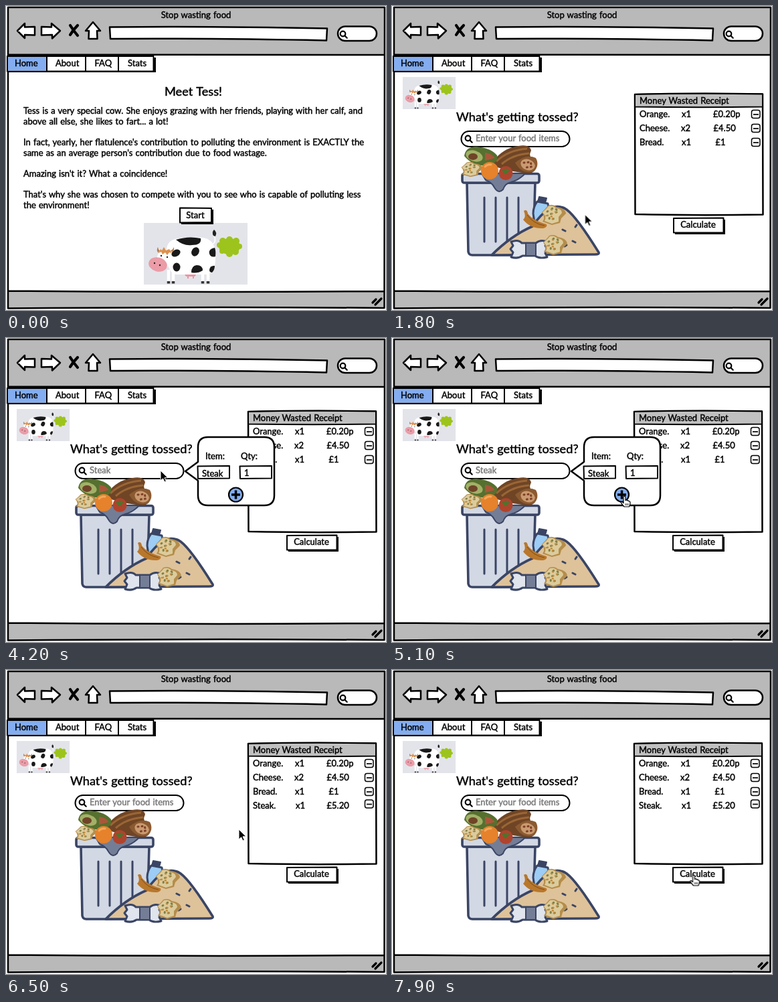
An HTML page that plays this animation: 568 by 454 pixels, repeating every 8000 ms.

```html
<!DOCTYPE html>
<html lang="en">
<head>
<meta charset="utf-8">
<title>Stop wasting food</title>
<style>
html, body { margin: 0; width: 100%; height: 100%; overflow: hidden; background: #fff; }
svg { display: block; }
text { font: 13px Lato, "Liberation Sans", sans-serif; word-spacing: .8px; fill: #000; stroke: #000; stroke-width: .45px; }
.title { font-size: 18.2px; }
.mid { text-anchor: middle; }
.hint { fill: #777; stroke: #777; }
.ink { fill: #fff; stroke: #000; stroke-width: 2.5; stroke-linejoin: round; stroke-linecap: round; }
.thin { stroke-width: 2; }
.line { fill: none; }
.blue { fill: #83adf0; }
.navy { stroke: #3a4565; stroke-width: 3.6; stroke-linejoin: round; stroke-linecap: round; }

.timed { animation: 8s step-end infinite; }
.home { animation-name: home; }
.toss { animation-name: toss; }
.idle { animation-name: idle; }
.adding { animation-name: adding; }
.added { animation-name: added; }
.receipt { animation-name: lift; }
.arrow { animation-name: arrow; }
.hand { animation-name: hand; }
.pointer { animation: move 8s ease-in-out infinite; }

@keyframes home { 0% { visibility: visible } 22.5%, 100% { visibility: hidden } }
@keyframes toss { 0% { visibility: hidden } 22.5%, 100% { visibility: visible } }
@keyframes idle { 0% { visibility: hidden } 22.5% { visibility: visible } 47.5% { visibility: hidden } 72.5%, 100% { visibility: visible } }
@keyframes adding { 0% { visibility: hidden } 47.5% { visibility: visible } 72.5%, 100% { visibility: hidden } }
@keyframes added { 0% { visibility: hidden } 72.5%, 100% { visibility: visible } }
@keyframes lift { 0% { transform: none } 47.5%, 100% { transform: translate(-1px, -22px) } }
@keyframes arrow {
  0% { visibility: hidden } 1.25% { visibility: visible } 13.75% { visibility: hidden }
  22.5% { visibility: visible } 33% { visibility: hidden } 47.5% { visibility: visible }
  61% { visibility: hidden } 72.5% { visibility: visible } 89.5%, 100% { visibility: hidden }
}
@keyframes hand {
  0% { visibility: hidden } 13.75% { visibility: visible } 22.5% { visibility: hidden }
  33% { visibility: visible } 47.5% { visibility: hidden } 61% { visibility: visible }
  72.5% { visibility: hidden } 89.5%, 100% { visibility: visible }
}
@keyframes move {
  0%, 1.25% { transform: translate(360px, 432px); animation-timing-function: ease-in }
  11.25% { transform: translate(342px, 387px); animation-timing-function: ease-out }
  15%, 25% { transform: translate(288.5px, 311.5px) }
  35%, 55% { transform: translate(231px, 198px) }
  62.5%, 82.5% { transform: translate(348px, 238px) }
  92.5%, 100% { transform: translate(451.5px, 308px) }
}
</style>
</head>
<body>
<svg width="568" height="454" viewBox="0 0 568 454">
  <defs>
    <g id="cow">
      <path fill="#e3e4ea" d="M0 0h155v92H0z"/>
      <g fill="#9dc41c">
        <ellipse cx="128" cy="35" rx="16" ry="12"/>
        <circle cx="113" cy="33" r="4"/><circle cx="118" cy="27" r="5"/><circle cx="128" cy="25" r="5"/>
        <circle cx="138" cy="27" r="5"/><circle cx="143" cy="35" r="4"/><circle cx="137" cy="43" r="5"/>
        <circle cx="128" cy="46" r="5"/><circle cx="117" cy="42" r="4"/>
      </g>
      <path fill="none" stroke="#fff" stroke-width="1.5" d="M103 32q6-4 2-13"/>
      <path fill="#222" d="M104 19q-3-5 1-9q5 4 2 10z"/>
      <path stroke="#fff" stroke-width="4.500" d="M37 70v20M44 70v20M88 70v20M96 70v20"/>
      <path stroke="#333" stroke-width="4.500" d="M37 87v3.500M44 87v3.500M88 87v3.500M96 87v3.500"/>
      <path fill="#e9959f" d="M61 75h17q0 5-3 5v3h-2v-3h-6v3h-2v-3q-4 0-4-5z"/>
      <path fill="#fff" d="M34 42C34 25 46 22 68 22C94 20 105 24 107 44C108 68 104 77 90 77H52C40 78 34 66 34 42z"/>
      <g fill="#191919">
        <path d="M48 25Q67 19 85 23Q87 33 72 33Q60 35 48 25z"/>
        <ellipse cx="48" cy="45" rx="7" ry="5" transform="rotate(-30 48 45)"/>
        <ellipse cx="77" cy="43" rx="5.500" ry="7" transform="rotate(30 77 43)"/>
        <path d="M106 37q-10 2-8 9q2 6 9 4q1-8-1-13zM71 74q0-10 8-11q9 0 9 8q-8 5-17 3z"/>
        <ellipse cx="49" cy="66" rx="5.500" ry="6.500"/>
        <path d="M106 64q-7-1-8 6q0 4 4 4q4-4 4-10z"/>
      </g>
      <path fill="#b57a4b" d="M22 45q-4-4-1-9q1 6 5 6zM41 45q5-3 4-9q-2 5-7 6z"/>
      <path fill="#fff" d="M23 42q10-5 19 1l-6 22q-9 6-20-3z"/>
      <path fill="#dc914f" d="M22 45l3-6 2 2 3-5 3 5 5-2 4 6-4-1-3 4-3-4-4 3-2-4z"/>
      <ellipse cx="21" cy="62" rx="14" ry="10.500" fill="#eb9ca7" transform="rotate(15 21 62)"/>
      <g fill="#222">
        <circle cx="26" cy="49" r="1.200"/><circle cx="35" cy="51" r="1.200"/>
        <circle cx="16" cy="60" r="1.200"/><circle cx="24" cy="63" r="1.200"/>
      </g>
    </g>

    <g id="slice">
      <path fill="#b58d4a" d="M-17-4Q-11-10-8-14Q0-17 5-12Q18-10 19-2L12 5 10 12-2 15-16 10Q-11 4-17-4z"/>
      <path fill="#dccb9c" d="M-16-4Q-10-9-7-13Q0-15 4-10Q13-9 13-3L8 3 8 10-2 13-13 9Q-9 3-16-4z"/>
      <path fill="none" stroke="#7f7f45" stroke-width="3" stroke-linecap="round" stroke-dasharray="1 7" d="M-9-5L1-11 8-5-5-1-6 7 5 5"/>
      <path fill="none" stroke="#c08a3c" stroke-width="2.500" stroke-linecap="round" stroke-dasharray="1 6" d="M-3-8L4-4-9 1 1 3-4 10"/>
    </g>

    <g id="minus">
      <rect x="537.500" y="-6.500" width="12.500" height="12" rx="3" fill="#fff" stroke="#000" stroke-width="1.500"/>
      <path stroke="#000" stroke-width="1.700" d="M540 0h8"/>
    </g>

    <g id="lens" class="line" stroke="#000" stroke-width="2.200" stroke-linecap="round">
      <circle r="3.800"/><path d="M3 3l3.200 3.200"/>
    </g>
  </defs>

  <!-- browser window -->
  <path fill="#b9b9b9" d="M3 2h563v71H3zM3 426h563v25H3z"/>
  <path class="ink line" d="M3 2Q200 1 566 2L565.500 451Q300 449 3 451.500Q2 220 3 2M3 72.500Q300 74 566 73M3 425.500Q290 428 565 426"/>
  <text class="mid" x="284" y="18">Stop wasting food</text>
  <g class="ink">
    <path d="M17 37L28 26V31.500L43 31V43.500L28 43V48z"/>
    <path d="M53 31L68 31.500V26L81 37 69 48.500V43L53 43.500z"/>
    <path d="M130 24L119 37H124L123.500 49H136.500L136 37H141z"/>
    <path d="M155 31.500Q300 30 480 33.500L479 51.500Q300 48 156 49z"/>
    <rect x="496" y="30.500" width="58" height="21.500" rx="10.750"/>
  </g>
  <path fill="none" stroke="#000" stroke-width="4.200" stroke-linecap="round" d="M96 29Q101 37 107 44M107 29Q100 36 96 43"/>
  <use href="#lens" x="503.500" y="41.500"/>
  <path stroke="#000" stroke-width="3.200" stroke-linecap="round" d="M548 443l5-5M552 446l9-9"/>

  <!-- tabs -->
  <path d="M4 77H224V99H4z"/>
  <path class="ink thin" d="M2 75H220.500V97.500H2z"/>
  <path class="blue" d="M3 76H60V96.500H3z"/>
  <path class="ink thin line" d="M61 75V97M119 75V97M168 75V97"/>
  <text x="13" y="90">Home</text>
  <text x="74" y="90">About</text>
  <text x="132.500" y="90">FAQ</text>
  <text x="182" y="90">Stats</text>

  <!-- welcome page -->
  <g class="timed home">
    <text class="title mid" x="280" y="134">Meet Tess!</text>
    <text x="26" y="161">Tess is a very special cow. She enjoys grazing with her friends, playing with her calf, and</text>
    <text x="26" y="177">above all else, she likes to fart... a lot!</text>
    <text x="26" y="208">In fact, yearly, her flatulence's contribution to polluting the environment is EXACTLY the</text>
    <text x="26" y="224">same as an average person's contribution due to food wastage.</text>
    <text x="26" y="255">Amazing isn't it? What a coincidence!</text>
    <text x="26" y="286">That's why she was chosen to compete with you to see who is capable of polluting less</text>
    <text x="26" y="302">the environment!</text>
    <use href="#cow" x="206" y="324"/>
    <path d="M262 304H310V326H262z"/>
    <path class="ink thin" d="M260 301.500L307 302V323L260 323.500z"/>
    <text class="mid" x="283" y="317">Start</text>
  </g>

  <!-- food page -->
  <g class="timed toss">
    <use href="#cow" transform="translate(16 106) scale(.51 .522)"/>
    <text class="title" x="96" y="172">What's getting tossed?</text>
    <rect class="ink thin" x="103.500" y="187" width="162" height="23" rx="11.500"/>
    <use href="#lens" x="113.500" y="197.500"/>

    <!-- bin -->
    <g class="navy" fill="#d2d8e4">
      <path d="M112 264L114 367Q115 372 120 372H205Q211 372 211 366L214 264z"/>
      <path class="line" stroke-width="3" d="M138 286V352M155 286V352M172 286V352M189 286V352"/>
      <rect x="105" y="250.500" width="115" height="13.500" rx="3"/>
      <path fill="#747d96" stroke-width="2" d="M134 250H199Q190 260 178 263Q169 265 166 274Q159 281 153 271Q149 263 140 260z"/>
    </g>
    <!-- pile -->
    <g class="navy">
      <path fill="#9dccf4" stroke-width="3" d="M217 292Q211 300 211 310L214 330H238L233 295z"/>
      <path fill="#3a4565" stroke-width="2" d="M220 285l11 2-2 7-11-2z"/>
      <path fill="#dec299" d="M149 372Q178 343 210 329Q222 311 234 304Q248 295 261 304Q276 315 309 368Q310 371 304 371z"/>
      <path class="line" stroke-width="3" d="M255 334l4 2M270 351l4 2M274 330l2-3M258 359l3-2"/>
      <path fill="#dfe4ed" stroke-width="3" d="M178 352Q189 348 194 354H215Q222 348 232 352L229 358 232 363 229 369 232 375Q220 378 214 373H195Q188 378 178 375L181 368 177 363 181 358z"/>
      <path fill="#747d96" stroke-width="2" d="M200 354H215V373H200z"/>
    </g>
    <path fill="#b9772b" d="M197 306Q202 303 203 310Q210 320 231 326Q233 330 226 332Q207 333 196 319Q201 315 197 306z"/>
    <path fill="none" stroke="#7d4b1b" d="M202 312Q211 325 228 328"/>
    <use href="#slice" x="241" y="312"/>
    <use href="#slice" x="243" y="357"/>

    <!-- scraps -->
    <path fill="#6f4526" d="M151 232Q166 212 189 209Q206 206 208 216Q202 226 216 231Q219 245 207 250Q181 249 151 239z"/>
    <path fill="none" stroke="#9a6635" stroke-width="3" d="M156 232Q174 215 202 213M164 236Q180 222 205 220"/>
    <path fill="#8c5a30" d="M184 234Q201 220 215 227Q221 238 212 247Q194 252 184 234z"/>
    <ellipse cx="203" cy="237" rx="11" ry="8" fill="#c99a70" transform="rotate(20 203 237)"/>
    <path fill="none" stroke="#7d3f25" stroke-width="3" stroke-linecap="round" stroke-dasharray="1 5" d="M197 234l10-1 2 7-8 1"/>
    <path fill="#55702f" d="M108 224Q110 210 126 210Q148 212 157 223Q160 233 145 238Q122 241 108 224z"/>
    <ellipse cx="123" cy="224" rx="13" ry="8" fill="#a3b068" transform="rotate(18 123 224)"/>
    <ellipse cx="121" cy="225" rx="7" ry="5" fill="#6f4428"/>
    <path fill="#a9573a" d="M139 219q10 1 15 8l-15 4z"/>
    <use href="#slice" transform="translate(119 244) scale(.9 .75)"/>
    <circle cx="146" cy="246" r="13" fill="#e5822b"/>
    <path fill="none" stroke="#f4a75a" stroke-width="3" stroke-linecap="round" d="M139 240q4-4 9-3"/>
    <circle cx="170" cy="249.500" r="10.500" fill="#b0432d"/>
    <path fill="#55702b" d="M170 241l2 4 5 0-4 3 1 4-4-2-4 2 1-5-4-2 5-1z"/>

    <!-- receipt -->
    <g class="timed receipt">
      <path class="ink" d="M363 132Q450 130 554 131.500L554.500 311.500Q450 313 363.500 311z"/>
      <path class="ink thin" style="fill:#c0c0c0" d="M363 132Q450 130 554 131.500V150.500Q460 152 363 150.500z"/>
      <text x="370" y="146">Money Wasted Receipt</text>
      <text x="370" y="166">Orange.</text><text x="433" y="166">x1</text><text x="480" y="166">£0.20p</text>
      <text x="370" y="187">Cheese.</text><text x="432" y="187">x2</text><text x="480.500" y="187">£4.50</text>
      <text x="370" y="208">Bread.</text><text x="433" y="208">x1</text><text x="483.500" y="208">£1</text>
      <use href="#minus" y="162"/>
      <use href="#minus" y="183"/>
      <use href="#minus" y="204"/>
      <g class="timed added">
        <text x="370" y="229">Steak.</text><text x="434" y="229">x1</text><text x="480.500" y="229">£5.20</text>
        <use href="#minus" y="222.500"/>
      </g>
      <path d="M423 319H498V341H423z"/>
      <path class="ink thin" d="M421 317L495.500 316.500V338.500H421z"/>
      <text class="mid" x="457.500" y="331">Calculate</text>
    </g>
  </g>

  <text class="hint timed idle" x="125" y="202">Enter your food items</text>

  <!-- add item popup -->
  <g class="timed adding">
    <text class="hint" x="125" y="202">Steak</text>
    <path class="ink" d="M302 148H386Q401 148 401 163V235Q401 250 386 250H302Q287 250 287 235V213L268 199 287 185V163Q287 148 302 148z"/>
    <text x="298" y="181">Item:</text>
    <text x="351" y="181">Qty:</text>
    <path class="ink thin" d="M286.500 191.500L334 191V209.500L287 210zM349.500 191.500L397 191V209.500L350 210z"/>
    <text x="293" y="207">Steak</text>
    <text x="356" y="206">1</text>
    <circle class="blue" cx="343.500" cy="234" r="10.500" stroke="#000" stroke-width="2.200"/>
    <path stroke="#000" stroke-width="3.500" d="M337 234h13M343.500 227.500v13"/>
  </g>

  <g class="pointer">
    <path class="timed arrow" stroke="#fff" d="M0 0V15L3.600 11.800 6 17 8.400 16 6 10.800H11z"/>
    <g class="timed hand" stroke="#000" stroke-width="1.200" stroke-linejoin="round">
      <path fill="#fff" d="M-2 0C-2-2.500 1-2.500 1 0V4.500C2 3.500 3.500 3.700 3.700 5 5 4 6 4.800 6 6 7.500 5.400 8 6.300 8 7.500V10L6.500 14H-1L-5.500 8.500C-6.500 7-4.500 6-3.400 7.200L-2 8.500z"/>
      <path d="M1 9v3M3 9v3M5 9v3" stroke-width=".8"/>
    </g>
  </g>
</svg>
</body>
</html>
```
